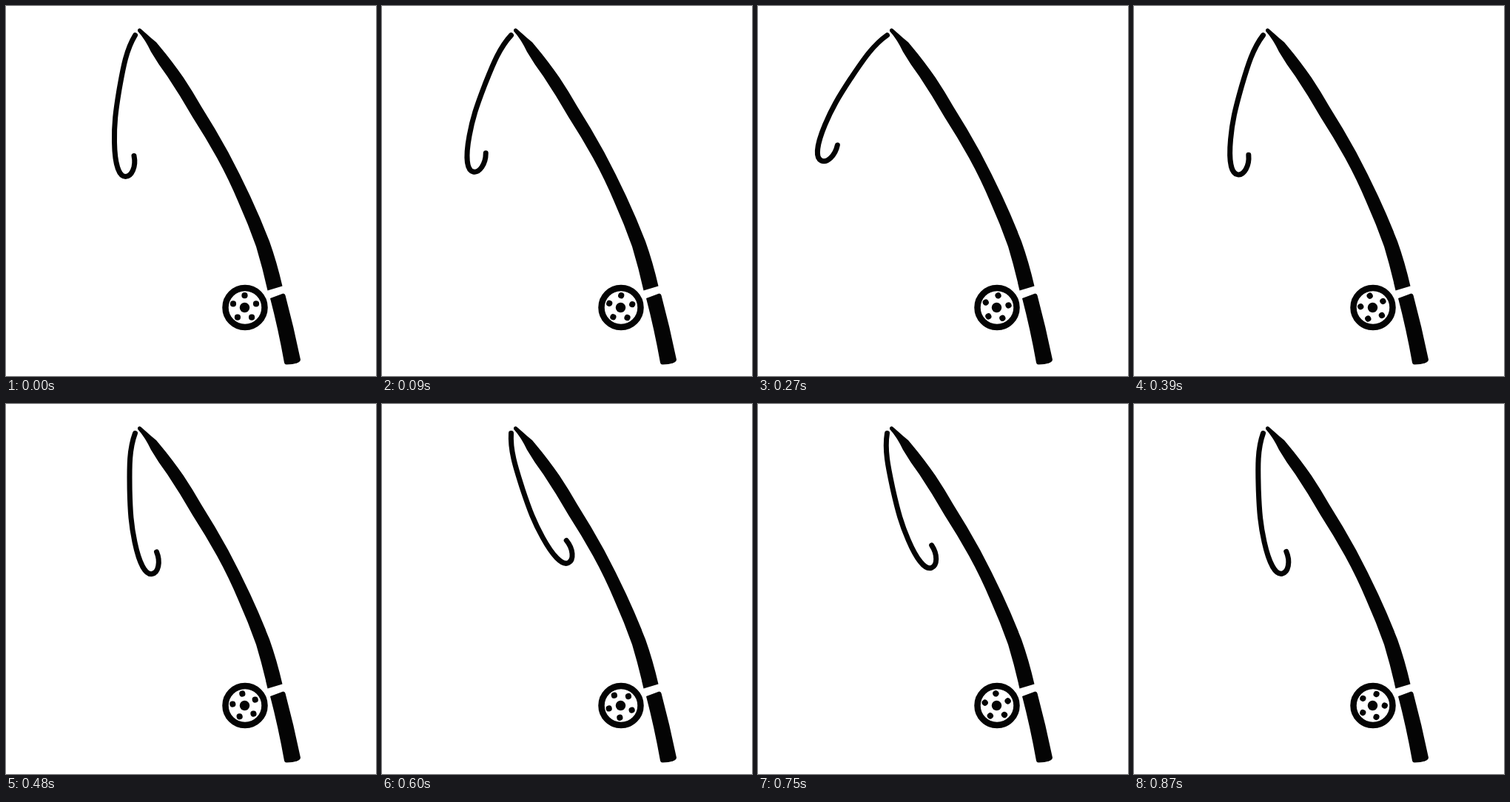
An HTML page for the animation above (900 ms loop, 500x500 px).

```html
<!DOCTYPE html>
<html lang="en">
<head>
<meta charset="utf-8">
<title>Fishing rod</title>
<style>
  html, body { margin: 0; width: 100%; height: 100%; overflow: hidden; background: #fff; }
  svg { display: block; width: 100%; height: 100%; }
</style>
</head>
<body>
<svg viewBox="0 0 500 500" fill="#040404">
  <path id="line" fill="none" stroke="#040404" stroke-width="7" stroke-linecap="round" stroke-linejoin="round"
    d="M174.5 39.5C162 60 158 85 153 113C148 143 146 160 146.5 184C147 212 152 230.5 161.5 230.5C170 230.5 176 217 173 202.5"/>
  <path d="M178 32Q180 28.500 184 32.500L197 44Q203 48 208 55Q224 74 240 97Q252 115 264 136Q283 166 300 197Q316 227 330 257Q344 287 356 318Q366 346 373.500 378.500L353.500 384.500Q347 355 338 325Q327 294 314 265Q301 234 285 205Q270 178 252 150Q236 122 218 95Q206 79 196 62Q188 45 178 34Z"/>
  <path d="M357 395L374.500 388.500Q377 388.500 377.500 391Q389 434 398 478Q397 484 379 484.500Q376.500 484.500 376 482Q368 437 357 395Z"/>
  <circle cx="323" cy="407.500" r="26.500" fill="none" stroke="#040404" stroke-width="8.500"/>
  <circle cx="322.500" cy="407.500" r="6.700"/>
  <g id="reel"></g>
</svg>
<script>
const LOOP = 900, STEP = 30;
const line = document.getElementById('line');
const reel = document.getElementById('reel');

for (let i = 0; i < 5; i++) {
  const dot = document.createElementNS('http://www.w3.org/2000/svg', 'circle');
  const a = i * Math.PI * 2 / 5;
  dot.setAttribute('cx', 322.5 + 16.3 * Math.sin(a));
  dot.setAttribute('cy', 407.5 - 16.3 * Math.cos(a));
  dot.setAttribute('r', 4.1);
  reel.append(dot);
}

// Swing of the line: [ms, degrees]
const swing = [[0, 0], [90, 11.6], [210, 26.2], [270, 23.8], [390, 6.4],
  [600, -27.8], [630, -28.4], [750, -22.2], [870, -11.6]];

const secant = i => (swing[i + 1][1] - swing[i][1]) / (swing[i + 1][0] - swing[i][0]);

// Harmonic mean of neighbouring slopes, flat at turning points
function slope(i) {
  if (i === 0) return secant(0);
  if (i === swing.length - 1) return secant(i - 1);
  const a = secant(i - 1), b = secant(i);
  return a * b > 0 ? 2 * a * b / (a + b) : 0;
}

function swingAt(t) {
  let i = 0;
  while (i < swing.length - 2 && t > swing[i + 1][0]) i++;
  const [t0, y0] = swing[i], [t1, y1] = swing[i + 1];
  const d = t1 - t0, u = (t - t0) / d, v = 1 - u;
  return y0 * v * v * (1 + 2 * u) + y1 * u * u * (3 - 2 * u)
    + d * u * v * (slope(i) * v - slope(i + 1) * u);
}

// Two turns per loop, with a small skip near the end
const spinAt = k => -23.2 * (k > 27 ? k + 1.25 : k);

function draw(now) {
  const k = Math.floor((now % LOOP) / STEP);
  line.setAttribute('transform', `rotate(${swingAt(k * STEP)} 174.5 39.5)`);
  reel.setAttribute('transform', `rotate(${spinAt(k)} 322.5 407.5)`);
}

let start;
function tick(now) {
  start ??= now;
  draw(now - start);
  requestAnimationFrame(tick);
}
draw(0);
requestAnimationFrame(tick);
</script>
</body>
</html>
```
